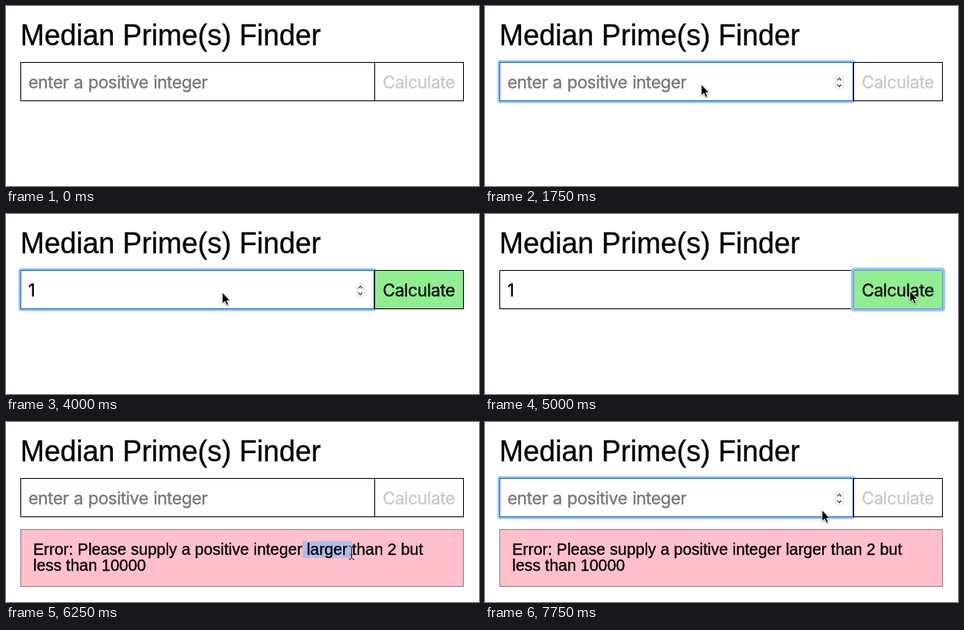
Animation of 592x225 px, one loop 8000 ms. Source, as an HTML page:

```html
<!DOCTYPE html>
<html lang="en">
<head>
<meta charset="utf-8">
<title>Median Prime(s) Finder</title>
<style>
html, body { margin: 0; width: 100%; height: 100%; overflow: hidden; background: #fff; }
svg { display: block; width: 592px; height: 225px; }
text { font-family: "Liberation Sans", Arial, sans-serif; white-space: pre; stroke: #000; stroke-width: .3px; }
.title { font-size: 36px; }
.field { font-family: Inter, sans-serif; font-size: 21.4px; letter-spacing: -.42px; word-spacing: .8px; }
.message { font-size: 20px; }
.box { fill: #fff; stroke: #000; }
.glow { fill: none; stroke: #8fc1f8; stroke-width: 3; filter: drop-shadow(0 0 1px #a9d0fa); }
#arrow { filter: drop-shadow(0 1px 1px #0005); }
</style>
</head>
<body>
<svg viewBox="0 0 592 225">
  <text class="title" x="18" y="49">Median Prime(s) Finder</text>

  <rect class="box" x="18.5" y="70.5" width="443" height="48"/>
  <text id="value" class="field" x="28" y="103"></text>
  <rect id="caret" y="82" width="1" height="26"/>
  <g id="inputFocus">
    <rect class="glow" x="17.5" y="69.5" width="444" height="50" rx="1.5"/>
    <rect x="18.5" y="70.5" width="442" height="48" fill="none" stroke="#2468b4"/>
  </g>
  <g id="spinner" fill="none">
    <rect x="438.5" y="86.5" width="10" height="18" rx="4" stroke="#dedede"/>
    <path d="M441 93l2.5-2.8 2.5 2.8M441 98l2.5 2.8 2.5-2.8" stroke="#444" stroke-width="1.2"/>
  </g>

  <rect id="button" class="box" x="461.5" y="70.5" width="111" height="48"/>
  <text id="label" class="field" x="471.5" y="103">Calculate</text>
  <rect id="buttonFocus" class="glow" x="460" y="69" width="114" height="51" rx="2"/>

  <g id="error">
    <rect x="18.5" y="134.5" width="554" height="71" fill="#ffc0cb" stroke="#8c8084"/>
    <path id="selection" fill="#b2bce8"/>
    <text class="message" x="34" y="166">Error: Please supply a positive integer larger than 2 but</text>
    <text class="message" x="34" y="186">less than 10000</text>
  </g>

  <g id="pointer">
    <path id="arrow" d="M.8 1V15L4 12.2 6.2 17.2 8.6 16.2 6.4 11.3H10.5Z" stroke="#fff" stroke-width=".9"/>
    <path id="beam" d="M3 .5Q6 .5 6.5 3 7 .5 10 .5M6.5 3V15M3 17.5Q6 17.5 6.5 15 7 17.5 10 17.5M4.5 11.5H8.5" fill="none" stroke="#222"/>
  </g>
</svg>
<script>
const DURATION = 8000, STEP = 250;
const APPEAR = 250, HOVER = 1000, FOCUS = 1250, TYPE = 3500, PRESS = 5000,
      FAIL = 5250, DRAG = 6250, DROP = 6500, REFOCUS = 7250;

const settle = p => 1 - .2 ** (3 * p);
const accelerate = power => p => p ** power;
const smooth = p => p * p * (3 - 2 * p);

// The pointer starts each move where the last one ended; a one-step move is a jump.
const moves = [
  { end: APPEAR, to: [371, 49] },
  { end: HOVER, steps: 3, to: [292, 96], ease: settle },
  { end: FOCUS, to: [270, 97] },
  { end: 4750, steps: 2, to: [560, 96], ease: accelerate(2.3) },
  { end: PRESS, to: [531, 95] },
  { end: 5750, to: [297, 174] },
  { end: DROP, steps: 3, to: [520, 181], ease: accelerate(1.35), lift: 28 },
  { end: 7000, to: [173, 116] },
  { end: 7750, steps: 3, to: [421, 109], ease: smooth }
];

const el = id => document.getElementById(id);
const show = (id, on) => { el(id).style.display = on ? '' : 'none'; };
const within = (time, start, end) => time >= start && time < end;

function pointerAt(time) {
  let x = 0, y = 0;
  for (const { end, steps = 1, to, ease = p => p, lift = 0 } of moves) {
    const p = Math.min(1, 1 + (time - end) / (steps * STEP));
    if (p <= 0) break;
    x += (to[0] - x) * ease(p);
    y += (to[1] - y) * p - lift * Math.sin(Math.PI * p);
  }
  return { x, y };
}

function caretOn(time) {
  const since = [FOCUS, TYPE, REFOCUS].findLast(start => start <= time);
  return (time - since) % 1000 < 500;
}

function selectionPath(time) {
  if (!within(time, DRAG, REFOCUS)) return '';
  const { x, y } = pointerAt(Math.min(time, DROP));
  const firstLine = `M371 149H${Math.min(x + 7, 527)}V170H371Z`;
  return y > 170 ? firstLine + 'M34 170H175V190H34Z' : firstLine;
}

function paintText(id, color) {
  el(id).style.fill = el(id).style.stroke = color;
}

function draw(time) {
  const filled = within(time, TYPE, FAIL);
  const inputFocused = within(time, FOCUS, PRESS) || time >= REFOCUS;
  const failed = time >= FAIL;

  el('value').textContent = filled ? '1' : 'enter a positive integer';
  paintText('value', filled ? '#000' : '#757575');
  paintText('label', filled ? '#000' : '#c8c8c8');
  el('button').style.fill = filled ? '#90ee90' : '#fff';

  show('inputFocus', inputFocused);
  show('spinner', inputFocused || within(time, HOVER, FOCUS));
  show('buttonFocus', within(time, PRESS, FAIL));
  show('caret', inputFocused && caretOn(time));
  el('caret').setAttribute('x', filled ? 40 : 29);
  show('error', failed);
  el('selection').setAttribute('d', selectionPath(time));

  const { x, y } = pointerAt(time);
  const overText = failed && y > 140 && y < 170;
  show('pointer', time >= APPEAR);
  el('pointer').setAttribute('transform', `translate(${x} ${y})`);
  show('arrow', !overText);
  show('beam', overText);
}

const origin = performance.now();
function tick() {
  const time = (performance.now() - origin) % DURATION;
  draw(Math.floor(time / STEP) * STEP);
  requestAnimationFrame(tick);
}
tick();
</script>
</body>
</html>
```
